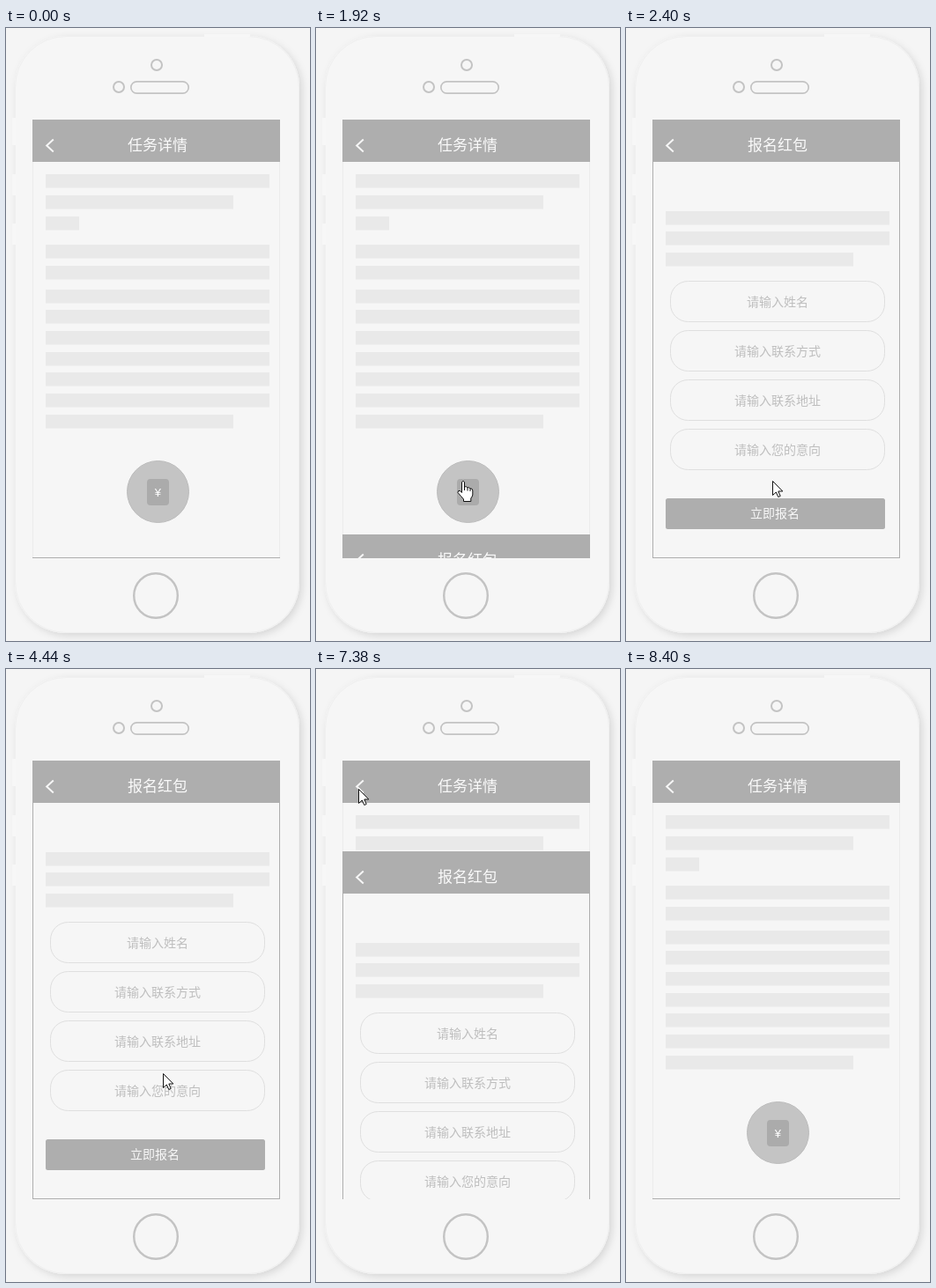
An HTML page that plays this animation: 345x696 px, repeating every 9120 ms.

```html
<!DOCTYPE html>
<html lang="zh">
<head>
<meta charset="utf-8">
<title>Form flow</title>
<style>
html, body { margin: 0; width: 100%; height: 100%; overflow: hidden; background: #f5f5f5; }
svg { display: block; width: 100vw; height: 100vh; }
text { font-family: "Noto Sans CJK SC", "Noto Sans CJK", sans-serif; text-anchor: middle; }
.title { font-size: 17px; fill: #fafafa; }
.hint { font-size: 14px; fill: #bebebe; }
.act { font-size: 14px; fill: #f8f8f8; }
.yen { font: 13px "Liberation Sans", sans-serif; fill: #fff; }
.line { fill: none; stroke: #c3c3c3; stroke-width: 2; }
.bar { fill: #e9e9e9; }
.field { fill: none; stroke: #dfdfdf; }
.cursor { fill: #fff; stroke: #111; stroke-width: 1; stroke-linejoin: round; }
</style>
</head>
<body>
<svg viewBox="0 0 345 696">
  <defs>
    <clipPath id="screen"><rect x="30" y="104" width="281" height="498"/></clipPath>
    <filter id="shade" x="-10%" y="-10%" width="120%" height="120%">
      <feDropShadow dx="3" dy="3" stdDeviation="4" flood-color="#000" flood-opacity=".13"/>
    </filter>
  </defs>
  <rect width="345" height="696" fill="#f5f5f5"/>
  <rect x="10" y="9" width="323" height="678" rx="58" fill="#f6f6f6" filter="url(#shade)"/>
  <rect x="10.5" y="9.5" width="322" height="677" rx="57.5" fill="#f6f6f6" stroke="#efefef"/>
  <g fill="#f7f7f7">
    <rect x="7" y="102" width="4" height="31"/>
    <rect x="7" y="166" width="4" height="24"/>
    <rect x="7" y="222" width="4" height="24"/>
    <rect x="225" y="7" width="52" height="3"/>
  </g>
  <g class="line">
    <circle cx="171" cy="42" r="6"/>
    <circle cx="128" cy="67" r="6"/>
    <rect x="141.8" y="60.8" width="65.4" height="13.4" rx="6.7" stroke-width="1.7"/>
    <ellipse cx="170" cy="644.5" rx="24.8" ry="25.2" stroke-width="2.4"/>
  </g>
  <g clip-path="url(#screen)">
    <g id="task"></g>
    <g id="form"></g>
  </g>
  <g id="pointer">
    <path id="arrow" class="cursor" d="M.5.5V16.5L4.3 13 6.8 18.5 9.2 17.4 6.8 12H11.8Z"/>
    <g id="hand" class="cursor">
      <path d="M-.5 1.5Q1-.7 2.5 1.5V7Q4.5 5.8 6 8Q8 6.8 9 9Q11.5 8.3 11.8 11V16Q11.5 18 9.8 20V23.5H1.5V21Q-1 18-5 13.5Q-5 10.5-2.5 11.5L-.5 13.5Z"/>
      <path d="M2.5 7V11M6 8V11.5M9 9V12" fill="none"/>
    </g>
    <path id="beam" d="M-2.5-7.5H-.5L.5-6.5 1.5-7.5H3.5M.5-6.5V7.5M-2.5 8.5H-.5L.5 7.5 1.5 8.5H3.5" fill="none" stroke="#111"/>
  </g>
</svg>
<script>
const LOOP = 9120, STEP = 60, TRAVEL = 498;
const el = id => document.getElementById(id);
const show = (node, on) => node.setAttribute('visibility', on ? 'visible' : 'hidden');
const clamp = v => Math.min(1, Math.max(0, v));
const swing = p => (1 - Math.cos(Math.PI * clamp(p))) / 2;

const bar = (y, w = 254, h = 15.5) => `<rect class="bar" x="45" y="${y}" width="${w}" height="${h}"/>`;
const label = (cls, x, y, s) => `<text class="${cls}" x="${x}" y="${y}">${s}</text>`;
const frame = color =>
  `<rect x="30.5" y="104.5" width="280" height="497" fill="#f6f6f6" stroke="${color}"/>`;
const header = title =>
  `<rect x="30" y="104" width="281" height="48" fill="#aeaeae"/>
   <path d="M53.8 126.5L46.2 133.5 53.8 140.5" fill="none" stroke="#f6f6f6" stroke-width="2"/>` +
  label('title', 172, 139, title);
const field = (y, hint) =>
  `<rect class="field" x="50.5" y="${y + .5}" width="243" height="46" rx="20"/>` +
  label('hint', 172, y + 29, hint);

el('task').innerHTML = frame('#ececec') +
  '<path d="M30 601.5H311" stroke="#aeaeae"/>' + header('任务详情') +
  bar(166) + bar(190, 213) + bar(214, 38) +
  [246, 270, 297, 320, 344, 368, 391, 415].map(y => bar(y)).join('') + bar(439, 213) +
  `<circle cx="172.5" cy="526.5" r="35" fill="#c4c4c4" stroke="#bcbcbc"/>
   <rect x="160" y="512" width="25" height="30" rx="4" fill="#ababab"/>` +
  label('yen', 172.3, 532, '¥') +
  '<circle id="tap" cx="172.5" cy="526.5" r="35.5" fill-opacity=".04"/>';

el('form').innerHTML = frame('#aeaeae') + header('报名红包') +
  bar(208) + bar(231) + bar(255, 213) +
  ['请输入姓名', '请输入联系方式', '请输入联系地址', '请输入您的意向']
    .map((s, i) => field(287 + i * 56, s)).join('') +
  '<rect x="45" y="534" width="249" height="35" rx="2.5" fill="#aeaeae"/>' +
  label('act', 169, 556, '立即报名') +
  '<rect id="back" x="30" y="104" width="51" height="51" fill-opacity=".04"/>';

// Pointer moves: start, end, from, to, ease-out power
const moves = [
  [420, 1260, [336, 53], [166, 514], 1.6],
  [2880, 3180, [166, 514], [193, 308], 1.5],
  [3300, 4260, [193, 308], [178, 435], 1],
  [4260, 4440, [178, 435], [178, 459], 1],
  [4440, 5280, [178, 459], [182, 551], 1.25],
  [5940, 6720, [182, 551], [48, 136], 2.45],
  [7980, 8340, [48, 136], [312, 76], .85]
];
const textRows = [311, 367, 423, 479, 551];

function pointerAt(t) {
  const [start, end, from, to, power] = moves.filter(m => m[0] <= t).pop() || moves[0];
  const p = 1 - Math.pow(1 - clamp((t - start) / (end - start)), power);
  return from.map((v, i) => Math.round(v + (to[i] - v) * p));
}

function pointerShape(t, x, y) {
  const onTap = t < 1990 && Math.hypot(x - 172.5, y - 526.5) < 35.5;
  const onBack = t > 5940 && t < 7320 && x < 81 && y < 155;
  if (onTap || onBack) return 'hand';
  const onText = t > 2400 && x > 137 && x < 221 && textRows.some(r => Math.abs(r - y) < 10);
  return onText ? 'beam' : 'arrow';
}

function draw(ms) {
  const t = Math.floor(ms % LOOP / STEP) * STEP;
  const up = swing((t - 1845) / 500), down = swing((t - 7230) / 500);
  const off = Math.round(TRAVEL * (1 - up + down));
  el('form').setAttribute('transform', `translate(0 ${off})`);
  show(el('form'), off < TRAVEL);
  show(el('tap'), t >= 1680 && t < 1920);
  show(el('back'), t >= 7080 && t < 7260);

  const [x, y] = pointerAt(t);
  const visible = t >= 420 && t < 8400;
  const shape = pointerShape(t, x, y);
  el('pointer').setAttribute('transform', `translate(${x} ${y})`);
  for (const id of ['arrow', 'hand', 'beam']) show(el(id), visible && id === shape);
}

const begin = performance.now();
function tick() {
  draw(performance.now() - begin);
  requestAnimationFrame(tick);
}
tick();
</script>
</body>
</html>
```
